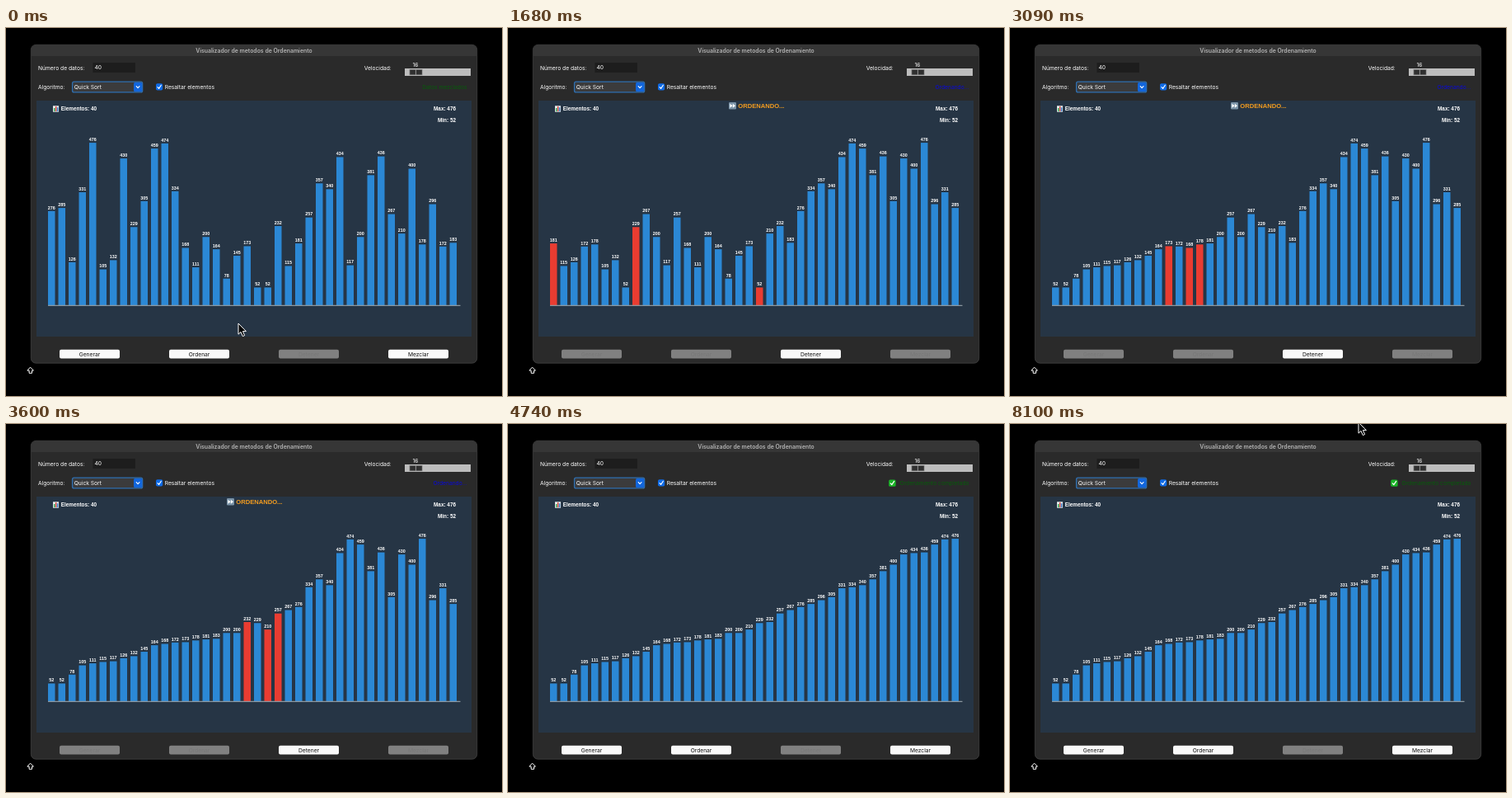
An HTML page for the animation above (8130 ms loop, 602x446 px).

```html
<!DOCTYPE html>
<html lang="es">
<head>
<meta charset="utf-8">
<title>Visualizador de metodos de Ordenamiento</title>
<style>
  html, body { margin: 0; width: 100%; height: 100%; overflow: hidden; background: #000; }
  svg { display: block; width: 602px; height: 446px; }
  text { font: 6.7px Inter, sans-serif; fill: #fff; }
  .mid { text-anchor: middle; }
  .end { text-anchor: end; }
  .title { font-size: 6.9px; font-weight: 600; fill: #b4b4b4; }
  .info { font: bold 6.4px "Liberation Sans", Arial, sans-serif; }
  .val { font: bold 5.4px "Liberation Sans", Arial, sans-serif; text-anchor: middle; }
  .busy { font: bold 7.6px "Liberation Sans", Arial, sans-serif; fill: #f39c1f; }
  .line { fill: none; stroke: #fff; stroke-linecap: round; stroke-linejoin: round; }
</style>
</head>
<body>
<svg id="stage" viewBox="0 0 602 446">
  <rect width="602" height="446"/>
  <rect x="30.3" y="20.3" width="541.4" height="385.9" rx="6" fill="#2a2a2a" stroke="#484848" stroke-width=".7"/>
  <path d="M30.6 34V26.5a6 6 0 0 1 6-6H565.4a6 6 0 0 1 6 6V34z" fill="#363636"/>
  <text class="mid title" x="301" y="29.7">Visualizador de metodos de Ordenamiento</text>

  <text x="39" y="50.7">Número de datos:</text>
  <rect x="105.5" y="42" width="51.5" height="12" fill="#1d1d1d"/>
  <text x="107.5" y="50.4">40</text>
  <text x="39" y="74.2">Algoritmo:</text>
  <rect x="80.6" y="65.1" width="85" height="12.8" rx="2" fill="#3b3b3c" stroke="#2f6eae" stroke-width="1.4"/>
  <rect x="155" y="66" width="10.2" height="11" rx="1.5" fill="#1266dc"/>
  <path class="line" d="M158.2 70.7l1.9 2 1.9-2" stroke-width="1.1"/>
  <text x="82.7" y="74.1">Quick Sort</text>
  <rect x="182" y="67.3" width="8.2" height="8.2" rx="1.8" fill="#0f6be6"/>
  <path class="line" d="M184 71.6l1.6 1.8 2.7-4.1" stroke-width="1.1"/>
  <text x="192.7" y="74.2">Resaltar elementos</text>

  <text x="434.7" y="50.7">Velocidad:</text>
  <text class="mid" x="497" y="46.5">16</text>
  <rect x="484" y="49" width="80" height="9" fill="#bdbdbd"/>
  <rect x="489.5" y="50" width="16" height="7.2" fill="#8a8a8a"/>
  <path d="M490.3 50.7h6.6v5.8h-6.6zM498 50.7h6.8v5.8H498z" fill="#303030"/>

  <text id="status" class="end" x="559.5" y="74.2"></text>
  <g id="done">
    <rect x="462.2" y="67.4" width="8.4" height="8.4" rx="1.6" fill="#19b526"/>
    <path class="line" d="M464.2 71.8l1.6 1.9 2.9-4.3" stroke-width="1.2"/>
  </g>

  <rect x="37" y="88" width="528" height="286" fill="#263545"/>
  <rect x="57" y="94.3" width="7" height="7.4" fill="#e9eef0"/>
  <path d="M58 97h1.5v4H58z" fill="#35a853"/>
  <path d="M59.9 95h1.5v6h-1.5z" fill="#d9463b"/>
  <path d="M61.8 96.2h1.5v4.8h-1.5z" fill="#3478c9"/>
  <text class="info" x="66.7" y="100.4">Elementos: 40</text>
  <text class="info end" x="546" y="100.4">Max: 476</text>
  <text class="info end" x="546" y="113.6">Min: 52</text>
  <g id="busy">
    <rect x="268" y="90" width="9" height="8.6" rx="1.3" fill="#7b94a8"/>
    <path d="M269.4 91.8l3.2 2.5-3.2 2.5zM272.8 91.8l3.2 2.5-3.2 2.5z" fill="#fff"/>
    <text class="busy" x="279.3" y="97.1">ORDENANDO...</text>
  </g>
  <g id="bars"></g>
  <path d="M51 336.3H551.5" stroke="#8b979f" stroke-width="1.2"/>
  <g id="buttons"></g>

  <path id="caps" class="line" d="M29.8 411.4l3.6 3.7h-1.9v3.2h-3.4v-3.2h-1.9z" stroke-width="1"/>
  <path id="cursor" d="M0 0V13.2l3-2.8 2.3 5.2 2.3-1-2.2-5H9.4z" fill="#000" stroke="#fff" stroke-width="1" stroke-linejoin="round"/>
</svg>
<script>
const LOOP = 8130, TICK = 30, SORT_START = 630, SORT_END = 4740;
const data = [276, 285, 126, 331, 476, 105, 132, 430, 229, 305, 459, 474, 334, 168,
  111, 200, 164, 78, 145, 173, 52, 52, 232, 115, 181, 257, 357, 340, 434, 117,
  200, 381, 436, 267, 210, 400, 178, 296, 172, 183];

// [time, x or step, y]
const pace = [[698, 0], [990, 18], [1680, 61], [3090, 148], [3990, 203], [4725, 248]];
const toButton = [[0, 282, 358], [390, 236, 391], [600, 236, 391], [900, 270, 416]];
const toMenu = [[7200, 426, -8], [7290, 424, -3], [8100, 423, -2]];

const $ = id => document.getElementById(id);

function add(parent, tag, attrs) {
  const el = document.createElementNS("http://www.w3.org/2000/svg", tag);
  for (const k in attrs) el.setAttribute(k, attrs[k]);
  return parent.appendChild(el);
}

function track(keys, t, col) {
  if (t <= keys[0][0]) return keys[0][col];
  for (let k = 1; k < keys.length; k++) {
    const a = keys[k - 1], b = keys[k];
    if (t <= b[0]) return a[col] + (b[col] - a[col]) * (t - a[0]) / (b[0] - a[0]);
  }
  return keys[keys.length - 1][col];
}

// Quick sort, first element as pivot; every move is one drawn step.
function record(source) {
  const a = source.slice(), steps = [];
  const show = (...marks) => steps.push({ a: a.slice(), marks });
  const swap = (p, q) => { [a[p], a[q]] = [a[q], a[p]]; };
  (function sort(low, high) {
    if (low >= high) return;
    const pivot = a[low];
    let i = low + 1, j = high;
    show(low, i, j);
    for (;;) {
      while (i <= j && a[i] <= pivot) { i++; show(low, i, j); }
      while (i <= j && a[j] > pivot) { j--; show(low, i, j); }
      if (i > j) break;
      swap(i, j);
      show(low, i, j);
    }
    swap(low, j);
    show(low, j);
    sort(low, j - 1);
    sort(j + 1, high);
  })(0, a.length - 1);
  return steps;
}

const steps = record(data);
const shuffled = { a: data, marks: [] };
const sorted = { a: steps[steps.length - 1].a, marks: [] };

const bars = data.map((_, i) => ({
  rect: add($("bars"), "rect", { x: 51 + 12.5 * i, width: 8.5 }),
  label: add($("bars"), "text", { class: "val", x: 55.2 + 12.5 * i })
}));

const buttons = ["Generar", "Ordenar", "Detener", "Mezclar"].map((name, i) => {
  const x = 65 + 133 * i;
  const rect = add($("buttons"), "rect", { x, y: 389.8, width: 73, height: 10.6, rx: 2 });
  const label = add($("buttons"), "text", { class: "mid", x: x + 36.5, y: 397.5 });
  label.textContent = name;
  return { rect, label };
});

function drawBars({ a, marks }) {
  bars.forEach(({ rect, label }, i) => {
    const h = a[i] * 0.4137, top = 336 - h;
    rect.setAttribute("y", top);
    rect.setAttribute("height", h);
    rect.setAttribute("fill", marks.includes(i) ? "#e93c31" : "#2b88d5");
    label.setAttribute("y", top - 2.2);
    label.textContent = a[i];
  });
}

function setVisible(id, on) {
  $(id).style.display = on ? "" : "none";
}

function drawControls(sorting, done) {
  buttons.forEach(({ rect, label }, i) => {
    const on = (i === 2) === sorting;
    rect.setAttribute("fill", on ? "#f9f9f9" : "#808080");
    label.style.fill = on ? "#111" : "#777";
  });
  $("status").textContent = sorting ? "Ordenando..." : done ? "Ordenamiento completado" : "Datos mezclados";
  $("status").style.fill = sorting ? "#0808dc" : "#075c0b";
  setVisible("busy", sorting);
  setVisible("done", done);
}

function drawCursor(t) {
  const path = t < 1200 ? toButton : toMenu;
  setVisible("cursor", t < 1200 || t >= 7200);
  setVisible("caps", t < 840 || t >= 1200);
  $("cursor").setAttribute("transform", `translate(${track(path, t, 1)} ${track(path, t, 2)})`);
}

function draw(t) {
  const sorting = t >= SORT_START && t < SORT_END, done = t >= SORT_END;
  const step = Math.floor(track(pace, t, 1) + 1e-6);
  drawBars(done ? sorted : t < pace[0][0] ? shuffled : steps[Math.min(step, steps.length - 1)]);
  drawControls(sorting, done);
  drawCursor(t);
}

const start = performance.now();
let last = -1;
function loop() {
  const now = Math.max(0, performance.now() - start) % LOOP;
  const t = Math.floor(now / TICK) * TICK;
  if (t !== last) draw(last = t);
  requestAnimationFrame(loop);
}
loop();
</script>
</body>
</html>
```
